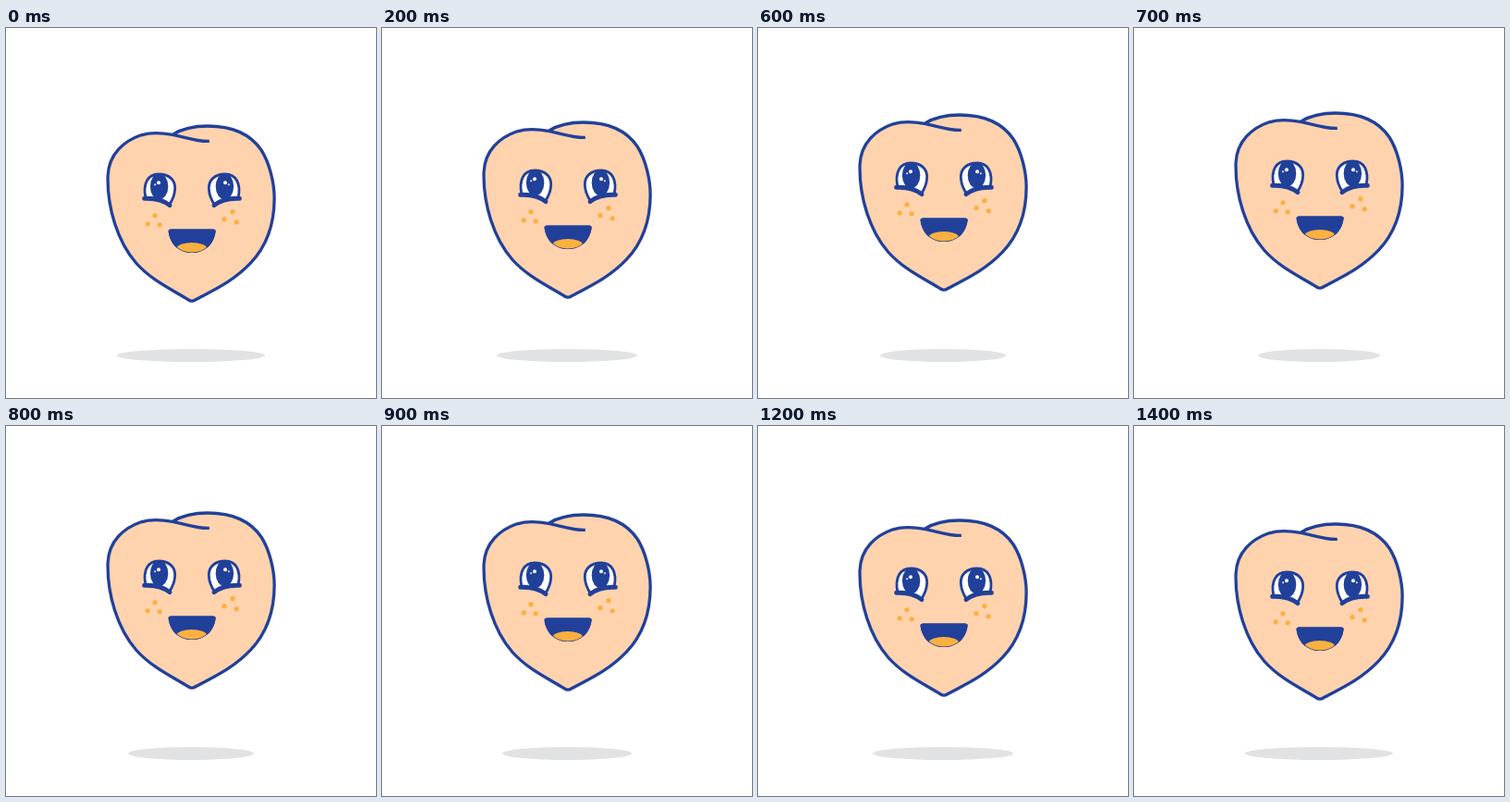
An HTML page for the animation above (1.5 s loop, 400 px wide and 400 px high).

```html
<!DOCTYPE html>
<html lang="en">
<head>
<meta charset="utf-8">
<title>Floating peach</title>
<style>
  html, body { margin: 0; width: 100%; height: 100%; overflow: hidden; background: #fff; }
  svg { display: block; width: 100vw; height: 100vh; }

  /* Seven held steps up, seven down; the small lead keeps step edges off exact ticks. */
  .peach, .shadow { animation: 1500ms -5ms infinite; }
  .peach { animation-name: float; }
  .shadow { animation-name: shrink; transform-origin: 200px 354px; fill: #e1e2e3; }

  @keyframes float {
    0% { transform: translateY(0); animation-timing-function: steps(7, end); }
    46.6667% { transform: translateY(-14px); animation-timing-function: steps(7, end); }
    93.3333%, 100% { transform: translateY(0); }
  }
  @keyframes shrink {
    0% { transform: scaleX(1); animation-timing-function: steps(7, end); }
    46.6667% { transform: scaleX(.825); animation-timing-function: steps(7, end); }
    93.3333%, 100% { transform: scaleX(1); }
  }

  .skin { fill: #ffd3ae; }
  .ink { fill: #21409a; }
  .line { fill: none; stroke: #21409a; stroke-width: 3.3; stroke-linecap: round; stroke-linejoin: round; }
  .body { stroke-linecap: butt; }
  .rim { stroke-width: 2.8; }
  .lid { stroke-width: 4.9; }
  .lip { stroke-width: 1.2; }
  .white { fill: #fff; }
  .orange { fill: #fbb040; }
</style>
</head>
<body>
<svg viewBox="0 0 400 400">
  <defs>
    <path id="body" d="M219.8 122.400C207 123 194 118 180 115.300C165 112.600 155 113 146 115.800C128 122 111 136 110.100 160C109.300 194 120.500 231 141 254.500C158 273.300 180.500 283.500 197.500 294Q201 296.300 204.500 294C223 284 244.500 275 264.400 254.200C283.500 234 290.100 209 290.100 184C290.100 168 285 146 276 132C263 113 241 106 218 106C204 106 190 109 180 115.300"/>
    <path id="rim" d="M151 184C147.500 168 153.500 158 165 158C177 158 183.200 165 182.700 174C182.200 182 179 187.500 176.500 191"/>
    <path id="mouth" d="M178.500 217.500H223.800Q227 217.500 226.600 220.200C224.800 234.300 214.300 243 201 243C187.700 243 177.400 234.300 175.600 220.200Q175.200 217.500 178.500 217.500Z"/>
    <clipPath id="mouthClip"><use href="#mouth"/></clipPath>
    <clipPath id="skinClip"><path d="M180 115.300L219.800 122.400L300 100H100V300H300V100H180Z"/></clipPath>
    <g id="eye">
      <path class="white" d="M151 184C147.500 168 153.500 158 165 158C177 158 183.200 165 182.700 174C182.200 182 179 187.500 176.500 191C170 185.500 160 184 151 184Z"/>
      <ellipse class="ink" cx="165.600" cy="171.200" rx="9.700" ry="14.200"/>
      <use href="#rim" class="line rim"/>
      <path class="line lid" d="M149.600 184.300C161 183.700 170 186 177 191.700"/>
      <circle class="white" cx="165" cy="167.300" r="2"/>
      <circle class="white" cx="161.200" cy="169.300" r="1"/>
    </g>
  </defs>

  <ellipse class="shadow" cx="200" cy="354" rx="80" ry="7"/>

  <g class="peach">
    <path class="skin" d="M180 115.300C165 112.600 155 113 146 115.800C128 122 111 136 110.100 160C109.300 194 120.500 231 141 254.500C158 273.300 180.500 283.500 197.500 294Q201 296.300 204.500 294C223 284 244.500 275 264.400 254.200C283.500 234 290.100 209 290.100 184C290.100 168 285 146 276 132C263 113 241 106 218 106C204 106 190 109 180 115.300Z"/>
    <use href="#body" class="line body"/>

    <use href="#eye"/>
    <use href="#eye" transform="translate(402) scale(-1 1)"/>

    <g class="orange">
      <circle cx="161" cy="202.800" r="2.600"/>
      <circle cx="153.200" cy="211.800" r="2.600"/>
      <circle cx="166.200" cy="212.800" r="2.600"/>
      <circle cx="245" cy="198.700" r="2.600"/>
      <circle cx="236" cy="206.700" r="2.600"/>
      <circle cx="249.200" cy="209.800" r="2.600"/>
    </g>

    <use href="#mouth" class="ink"/>
    <g clip-path="url(#mouthClip)">
      <ellipse class="orange" cx="200.800" cy="237.700" rx="16" ry="5.700"/>
      <use href="#mouth" class="line lip"/>
    </g>
  </g>
</svg>
</body>
</html>
```
